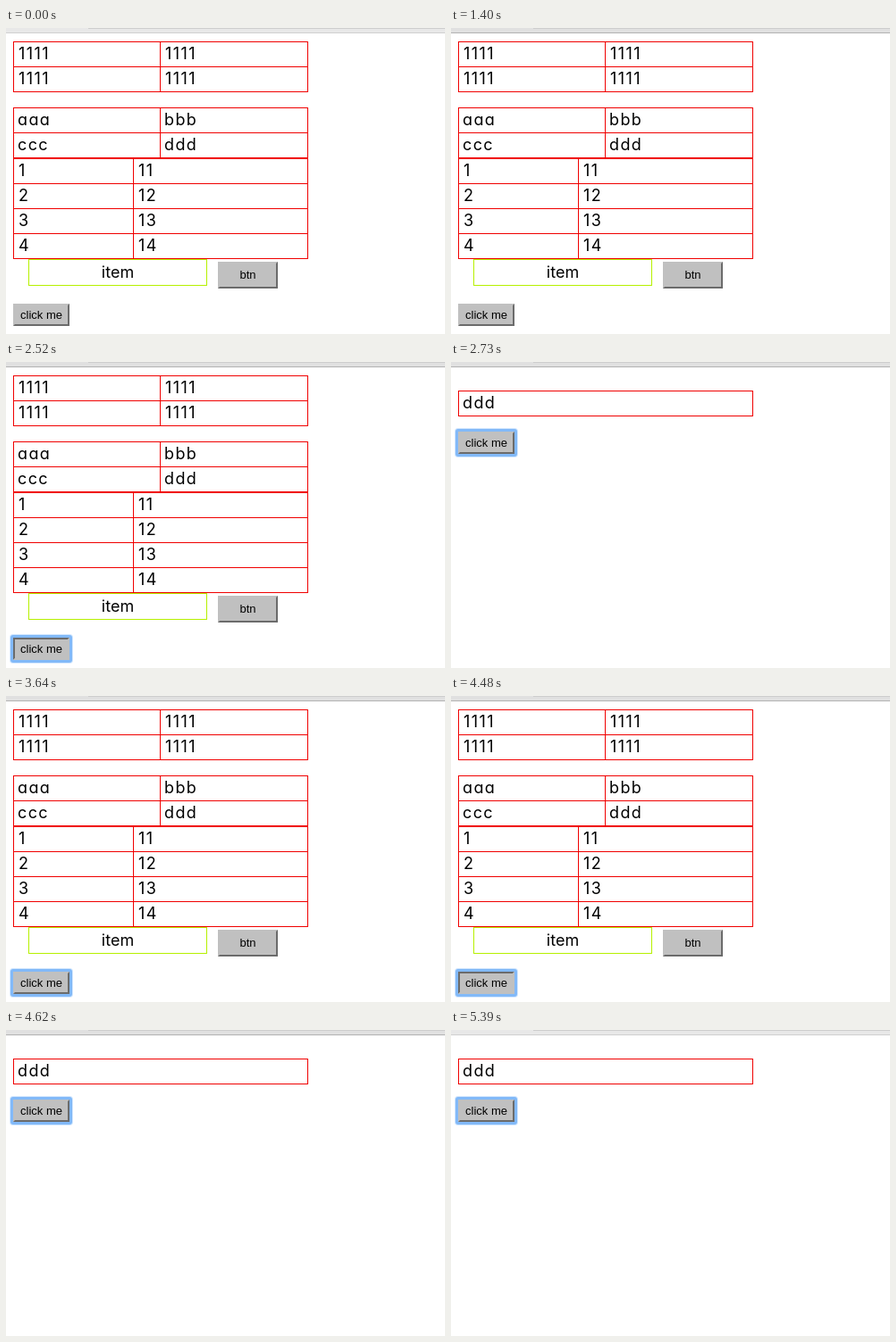
Recreate the animation shown at these times as an HTML page. Size 491 by 343 pixels, loop 5460 ms.

```html
<!DOCTYPE html>
<html lang="en">
<head>
<meta charset="utf-8">
<title>Table view toggle</title>
<style>
  html, body { margin: 0; width: 100%; height: 100%; overflow: hidden; background: #fff; }
  svg { display: block; width: 491px; height: 343px; }
  .cell { font: 400 18px Inter, Lato, sans-serif; font-feature-settings: "cv11"; letter-spacing: 1.4px; }
  .item { letter-spacing: 0; }
  .label { font: 13px "Liberation Sans", Arial, sans-serif; text-anchor: middle; }
</style>
</head>
<body>
<svg id="stage" viewBox="0 0 491 343"></svg>
<script>
const LOOP = 5460;
const RED = "#f00000";
const stage = document.getElementById("stage");

// start time, page, button focused, button pressed, window active
const steps = [
  [0, "full", false, false, false],
  [1400, "full", false, false, true],
  [2520, "full", true, true, true],
  [2730, "short", true, false, true],
  [3500, "short", true, true, true],
  [3640, "full", true, false, true],
  [4480, "full", true, true, true],
  [4620, "short", true, false, true],
  [5390, "short", true, false, false]
];

function add(parent, tag, attrs = {}, text = "") {
  const el = document.createElementNS("http://www.w3.org/2000/svg", tag);
  for (const key in attrs) el.setAttribute(key, attrs[key]);
  el.textContent = text;
  return parent.appendChild(el);
}

const box = (parent, x, y, width, height, fill, more) =>
  add(parent, "rect", { x, y, width, height, fill, ...more });

const frame = (parent, x, y, w, h, stroke) =>
  box(parent, x + 0.5, y + 0.5, w - 1, h - 1, "none", { stroke });

function table(parent, top, split, rows) {
  const height = rows.length * 28 + 1;
  frame(parent, 8, top, 330, height, RED);
  if (split) box(parent, split, top, 1, height, RED);
  rows.forEach((row, i) => {
    const y = top + i * 28;
    if (i) box(parent, 8, y, 330, 1, RED);
    row.forEach((text, col) => {
      const x = (col ? split : 8) + (/\d/.test(text) ? 6 : 5);
      add(parent, "text", { x, y: y + 20, class: "cell" }, text);
    });
  });
}

function button(parent, x, y, w, h, text) {
  const g = add(parent, "g", { transform: `translate(${x} ${y})` });
  const ring = add(g, "g");
  box(ring, -4, -4, w + 8, h + 8, "#85bdfb", { rx: 4, opacity: 0.35 });
  box(ring, -3, -3, w + 6, h + 6, "#82b9f8", { rx: 3 });
  box(g, 0, 0, w, h, "#c0c0c0");
  const upper = add(g, "path", { d: `M0 0H${w}L${w - 2} 2H2V${h - 2}L0 ${h}Z` });
  const lower = add(g, "path", { d: `M${w} ${h}H0L2 ${h - 2}H${w - 2}V2L${w} 0Z` });
  add(g, "text", { x: w / 2, y: Math.round(h / 2 + 4), class: "label" }, text);
  return (focused, pressed) => {
    ring.style.display = focused ? "" : "none";
    upper.setAttribute("fill", pressed ? "#6b6b6b" : "#c0c0c0");
    lower.setAttribute("fill", pressed ? "#c0c0c0" : "#6b6b6b");
  };
}

const bar = box(stage, 0, 0, 491, 5, "#e8e8e8");
box(stage, 92, 0, 399, 1, "#cdcdcd");
const edge = box(stage, 0, 5, 491, 1, "#d0d0d0");

const full = add(stage, "g");
table(full, 15, 172, [["1111", "1111"], ["1111", "1111"]]);
table(full, 89, 172, [["aaa", "bbb"], ["ccc", "ddd"]]);
table(full, 146, 142, [["1", "11"], ["2", "12"], ["3", "13"], ["4", "14"]]);
frame(full, 25, 259, 200, 30, "#b6f000");
add(full, "text", { x: 125, y: 280, class: "cell item", "text-anchor": "middle" }, "item");
button(full, 237, 262, 67, 30, "btn")(false, false);

const short = add(stage, "g");
table(short, 32, 0, [["ddd"]]);

const pages = {
  full: { group: full, paint: button(full, 8, 309, 63, 25, "click me") },
  short: { group: short, paint: button(short, 8, 78, 63, 25, "click me") }
};

let current;
function show(time) {
  const step = steps.findLast(s => s[0] <= time);
  if (step === current) return;
  current = step;
  const [, page, focused, pressed, active] = step;
  for (const name in pages) pages[name].group.style.display = name === page ? "" : "none";
  pages[page].paint(focused, pressed);
  bar.setAttribute("fill", active ? "#e0e0e0" : "#e8e8e8");
  edge.setAttribute("fill", active ? "#b2b2b2" : "#d0d0d0");
}

const start = performance.now();
function tick() {
  show((performance.now() - start) % LOOP);
  requestAnimationFrame(tick);
}
show(0);
requestAnimationFrame(tick);
</script>
</body>
</html>
```
